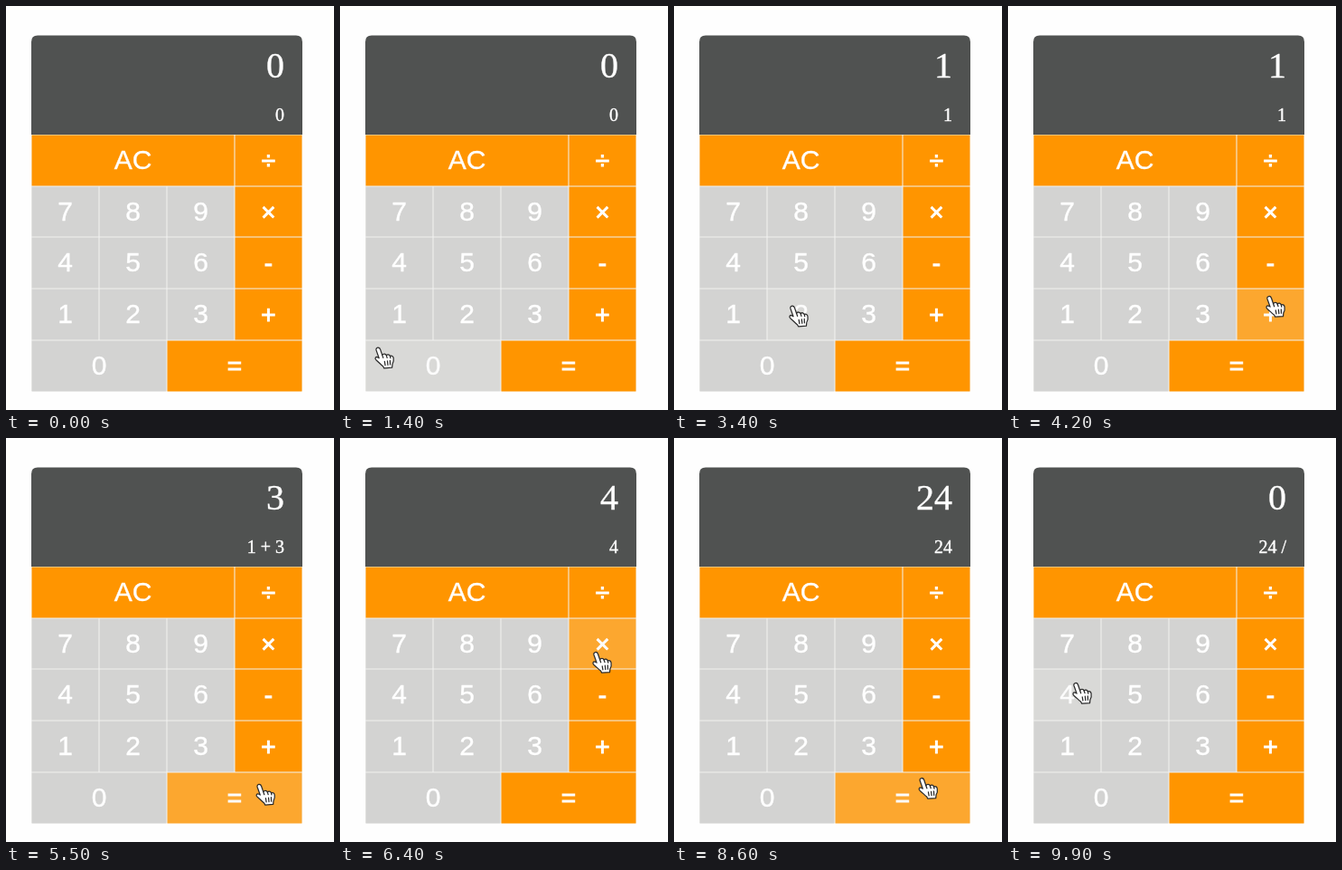
An HTML page for the animation above (10000 ms loop, 363 by 446 pixels).

```html
<!DOCTYPE html>
<html lang="en">
<head>
<meta charset="utf-8">
<title>Calculator</title>
<style>
  html, body { margin: 0; width: 100%; height: 100%; overflow: hidden; background: #fefefe; }
  svg { display: block; width: 363px; height: 446px; }
  text { fill: #fff; stroke: #fff; stroke-width: .4; }
  #pad text { font: 30px "Liberation Sans", Arial, sans-serif; text-anchor: middle; }
  #pad .op text { font-size: 28px; stroke-width: 1; }
  #pad rect { fill: #d3d3d2; }
  #pad .warm rect { fill: #ff9500; }
  #pad .hover { opacity: .8; }
  .read { font-family: "Liberation Serif", "Times New Roman", serif; text-anchor: end; }
</style>
</head>
<body>
<svg viewBox="0 0 363 446">
  <path d="M28 142V39.5q0-7 7-7H321q7 0 7 7V142Z" fill="#505251"/>
  <path d="M28 142H328V425H28Z" fill="#f2f2f0"/>
  <text id="big" class="read" x="308" y="78.5" font-size="40"></text>
  <text id="small" class="read" x="308" y="127" font-size="20"></text>
  <g id="pad"></g>
  <g id="hand" stroke="#2b2b2b" stroke-width="1.2" stroke-linejoin="round" stroke-linecap="round">
    <path fill="#fff" d="M-3 1C-3.5-2 .6-2.5 1.4.6L3 6.6C4 4.8 6.8 5.3 7.3 7.2C8.6 5.8 10.8 6.6 11.2 8.4C12.8 7.6 14.4 8.6 14.6 10.6C14.9 13 14.4 15 13 17L12.4 20.5H4L3 18.4C.8 16.4-1.2 13.8-3.6 11.6C-5.8 9.4-3.8 7.4-1.6 8.8L-.6 9.6Z"/>
    <path fill="none" d="M3 6.6l.8 3M7.3 7.2l.6 2.6M11.2 8.4l.3 2M5 13.5l.4 4M8 13.2l.2 4.2M10.8 13l-.1 4.2"/>
  </g>
</svg>
<script>
const $ = id => document.getElementById(id);

// A repeated character is one wide key.
const ROWS = ['CCC÷', '789×', '456-', '123+', '00=='];
const SIGN = { '×': '*', '÷': '/' };
const MATH = { '+': (a, b) => a + b, '*': (a, b) => a * b };

// Visits of the hand: it sets off, arrives at x, y and presses the key.
const VISITS = [
  { key: '1', go: 1200, stop: 1700, x: 67, y: 337, press: 2300 },
  { key: '+', go: 2900, stop: 4200, x: 290, y: 322, press: 4500 },
  { key: '3', go: 4600, stop: 4800, x: 222, y: 340, press: 5100 },
  { key: '=', go: 5200, stop: 5600, x: 288, y: 389, press: 5900 },
  { key: '×', go: 6100, stop: 6400, x: 284, y: 238, press: 6700 },
  { key: '6', go: 6900, stop: 7400, x: 222, y: 285, press: 7700 },
  { key: '=', go: 7700, stop: 8100, x: 274, y: 400, press: 8400 },
  { key: '÷', go: 8500, stop: 8900, x: 286, y: 178, press: 9200 },
  { key: '4', go: 9300, stop: 9900, x: 76, y: 272, press: Infinity }
];
const ENTRY = { x: 32, y: 398 };

const rowY = r => Math.round(142 + r * 56.7);

const keys = ROWS.flatMap((row, r) => [...row.matchAll(/(.)\1*/g)].map(m => {
  const label = m[1], x = 28 + m.index * 75, y = rowY(r);
  const w = m[0].length * 75, h = rowY(r + 1) - y;
  const kind = label === 'C' ? 'warm' : /\d/.test(label) ? '' : 'op warm';
  $('pad').insertAdjacentHTML('beforeend',
    `<g class="${kind}">
      <rect x="${x + .5}" y="${y + .5}" width="${w - 1}" height="${h - 1}"/>
      <text x="${x + w / 2}" y="${y + 38}">${label === 'C' ? 'AC' : label}</text></g>`);
  return { el: $('pad').lastElementChild, x, y, w, h };
}));

function readout(t) {
  let big = '0', terms = ['0'];
  for (const { key, press } of VISITS) {
    if (press > t) break;
    if (/\d/.test(key)) {
      big = key;
      terms = terms.length > 1 ? [...terms, key] : [key];
    } else if (key === '=') {
      big = String(MATH[terms[1]](+terms[0], +terms[2]));
      terms = [big];
    } else {
      big = '0';
      terms.push(SIGN[key] || key);
    }
  }
  return [big, terms.join(' ')];
}

const ease = u => u * u * u * (u * (6 * u - 15) + 10);

function pointAt(t) {
  if (t < VISITS[0].go) return { x: -50, y: -50 };
  const i = VISITS.findLastIndex(v => v.go <= t);
  const to = VISITS[i], from = VISITS[i - 1] || ENTRY;
  const e = ease(Math.min(1, (t - to.go) / (to.stop - to.go)));
  return { x: from.x + (to.x - from.x) * e, y: from.y + (to.y - from.y) * e };
}

function draw(now) {
  const t = Math.floor(now % 10000 / 100) * 100;
  [$('big').textContent, $('small').textContent] = readout(t);

  const p = pointAt(t);
  $('hand').setAttribute('transform', `translate(${p.x} ${p.y}) rotate(-4) scale(1.05)`);
  for (const { el, x, y, w, h } of keys)
    el.classList.toggle('hover', p.x >= x && p.x < x + w && p.y >= y && p.y < y + h);
  requestAnimationFrame(draw);
}
draw(performance.now());
</script>
</body>
</html>
```
